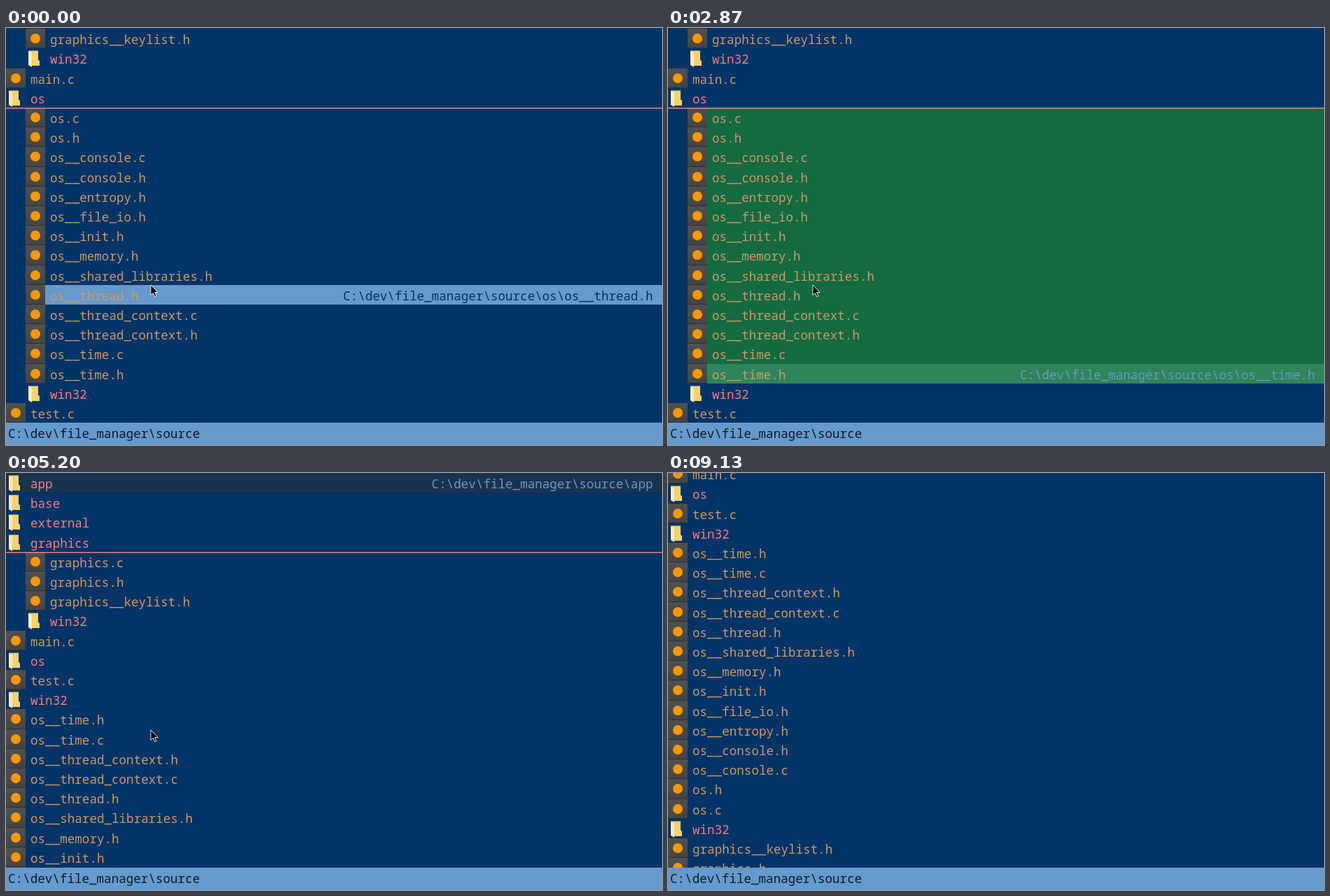
These frames come from a looping animation (938x597 px, 9.74 s). An HTML page:

```html
<!DOCTYPE html>
<html lang="en">
<head>
<meta charset="utf-8">
<title>File manager</title>
<style>
html, body { margin: 0; width: 100%; height: 100%; overflow: hidden; background: #003366; }
body { position: relative; font: 17.58px/28px "Noto Sans Mono", "DejaVu Sans Mono", monospace; white-space: pre; font-variant-ligatures: none; }
#view { position: absolute; left: 0; top: 0; width: 938px; height: 565px; overflow: hidden; }
.row { position: absolute; left: 0; right: 0; color: #cc9966; }
.row.child { left: 28px; }
.row.dir { color: #f08080; }
.row span { position: absolute; top: 1px; left: 35px; }
.row .path { left: auto; right: 13px; color: #6699cc; }
.sel { background: #1a334d; }
.mark { background: #146b40; }
.sel.mark { background: #2e855a; }
.hover { background: #6699cc; }
.hover .path { color: #003366; }
.tile { position: absolute; left: 0; top: 0; width: 28px; height: 100%; background: linear-gradient(#505050, #444); box-shadow: inset 0 -1px #2c3034; }
.tile::after { content: ""; position: absolute; left: 7px; top: 7px; width: 14px; height: 14px; border-radius: 50%; background: #ff9800; }
.row svg { position: absolute; left: 0; top: 0; }
.rule { position: absolute; z-index: 1; left: 0; width: 100%; height: 2px; background: linear-gradient(#f08080 50%, #f0808080 50%); }
#bar { position: absolute; left: 0; top: 565px; width: 938px; height: 32px; background: #6699cc; color: #0a1a2a; }
#bar span { position: absolute; left: 3px; top: 1px; }
#mouse { position: absolute; left: 206px; top: 0; }
</style>
</head>
<body>
<div id="view"></div>
<div id="bar"><span></span></div>
<svg id="mouse" width="13" height="20" viewBox="0 0 13 20"><path d="M1 .8V15.4L4.3 12.3 6.6 17.6 8.9 16.6 6.7 11.5H11.2Z" fill="#000" stroke="#fff" stroke-width=".9"/></svg>
<script>
const LOOP = 9740, FPS = 15, ROW = 28.2, VIEW = 565.2, MARGIN = ROW * 1.5;
const ROOT = 'C:\\dev\\file_manager\\source';
const view = document.getElementById('view');
const mouse = document.getElementById('mouse');
document.querySelector('#bar span').textContent = ROOT;

const FOLDER = '<svg width="28" height="28"><path d="M4.5 3.5H18V16.5L20 18V25H9L5 22Z" fill="#f5d273"/>' +
  '<path d="M4 3.5L9 6.5V27L4 24Z" fill="#ffeeb8"/></svg>';

// Files
const items = (names, dir = '') => names.split(' ').map(name =>
  ({ name, path: ROOT + '\\' + dir + name, folder: !name.includes('.') }));
const nest = list => list.map(f => ({ ...f, child: true }));
const open = f => ({ ...f, open: true });
const both = names => names.split(' ').map(n => `os__${n}.c os__${n}.h`).join(' ');
const heads = names => names.split(' ').map(n => `os__${n}.h`).join(' ');

const top3 = items('app base external');
const [graphics, main, os, test] = items('graphics main.c os test.c');
const gFiles = items('graphics.c graphics.h graphics__keylist.h win32', 'graphics\\');
const osFiles = items(['os.c os.h', both('console'),
  heads('entropy file_io init memory shared_libraries thread'),
  both('thread_context time'), 'win32'].join(' '), 'os\\');
const osMoved = [...osFiles].reverse(), gMoved = [...gFiles].reverse();

const lists = [
  [...top3, open(graphics), ...nest(gFiles), main, open(os), ...nest(osFiles), test],
  [...top3, open(graphics), ...nest(gFiles), main, os, test, ...osMoved],
  [...top3, graphics, main, os, test, ...osMoved, ...gMoved]
];
const MAX_SCROLL = lists[0].length * ROW - VIEW;

// User actions, times in seconds
const press = (at, by) => ({ at, until: at, run: s => { s.sel += by; } });
const hold = (at, until, by) => ({ at, until, run: s => { s.sel = Math.max(0, s.sel + by); } });
const set = (at, values) => ({ at, until: at, run: s => Object.assign(s, values) });
const paste = (at, list, first) => set(at, { list, sel: lists[list].indexOf(first), mark: -1 });
const mark = at => ({ at, until: at, run: s => { s.mark = s.sel; } });
const point = (at, speed) => ({ at, until: 10, run: s => {
  s.hover = true;
  s.my += speed / FPS;
  s.sel = s.my < VIEW ? Math.floor((s.my + s.scroll) / ROW) : -1;
} });

const actions = [
  set(0.27, { sel: lists[0].findIndex(f => f.name === 'os'), hover: false }),
  press(0.73, 1), mark(1.93), press(2, 1), hold(2.53, 2.87, 2), press(3.07, 1),
  paste(3.67, 1, osMoved[0]),
  press(4.2, -1), press(4.67, -1), hold(4.73, 5.13, -2),
  press(5.27, 1), press(5.47, 1), press(5.67, 1), press(6, 1),
  mark(6.6), press(6.8, 1), press(7, 1), press(7.13, 1),
  paste(7.87, 2, gMoved[0]),
  point(8.87, 930)
];

// The view eases towards the selected row, keeping a margin above and below it
function follow(s) {
  const y = s.sel * ROW;
  let goal = Math.max(Math.min(s.scroll, y - MARGIN), y + ROW + MARGIN - VIEW);
  goal = Math.max(0, Math.min(MAX_SCROLL, goal));
  s.scroll += (goal - s.scroll) * 2 / 3;
  if (Math.abs(goal - s.scroll) < 2) s.scroll = goal;
}

const states = [];
const now = { list: 0, sel: 19, mark: -1, hover: true, my: 368, scroll: MAX_SCROLL };
for (let n = 0; n <= LOOP * FPS / 1000; n++) {
  for (const a of actions)
    if (n >= Math.round(a.at * FPS) && n <= Math.round(a.until * FPS)) a.run(now);
  if (!now.hover) follow(now);
  states.push({ ...now });
}

function rowHtml(f, i, s) {
  const y = Math.round(i * ROW - s.scroll), h = Math.round((i + 1) * ROW - s.scroll) - y;
  if (y + h < 0 || y > VIEW) return '';
  const sel = i === s.sel;
  const marked = s.mark >= 0 && i >= s.mark && i <= s.sel;
  const cls = ['row', f.child && 'child', f.folder && 'dir',
    sel && (s.hover ? 'hover' : 'sel'), marked && 'mark'].filter(Boolean).join(' ');
  return `<div class="${cls}" style="top:${y}px;height:${h}px">` +
    (f.folder ? FOLDER : '<i class="tile"></i>') + `<span>${f.name}</span>` +
    (sel ? `<span class="path">${f.path}</span>` : '') + '</div>' +
    (f.open ? `<div class="rule" style="top:${y + h}px"></div>` : '');
}

let shown = null;
function draw(t) {
  // Changes fall on times rounded to 10 ms
  const s = states[Math.floor((t + 5) * FPS / 1000)];
  if (s === shown) return;
  shown = s;
  view.innerHTML = lists[s.list].map((f, i) => rowHtml(f, i, s)).join('');
  mouse.style.top = s.my - 1 + 'px';
}
const start = performance.now();
function tick() {
  draw((performance.now() - start) % LOOP);
  requestAnimationFrame(tick);
}
tick();
</script>
</body>
</html>
```
